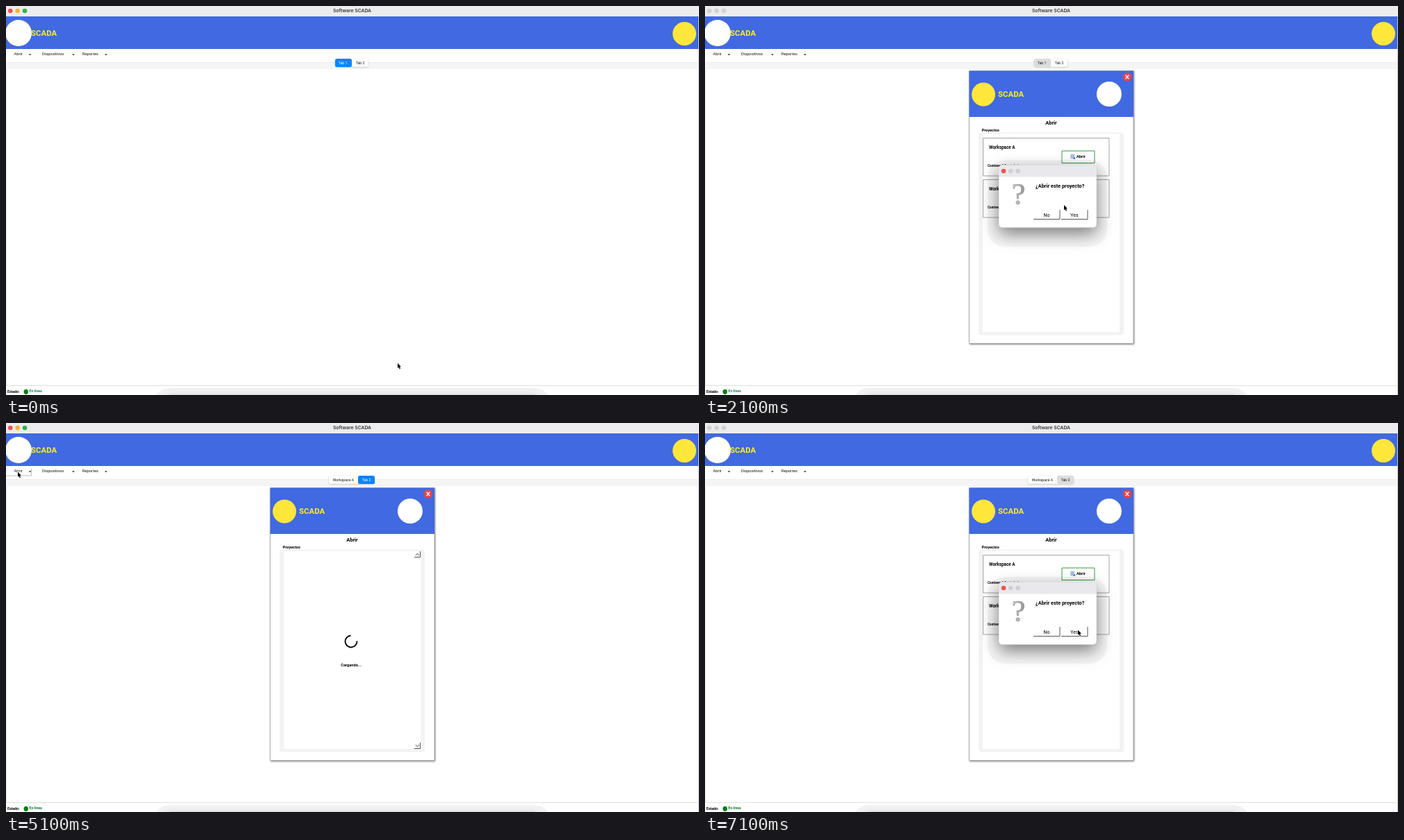
These frames come from a looping animation (998x561 px, 8000 ms). An HTML page with a canvas:

```html
<!DOCTYPE html>
<html lang="es">
<head>
<meta charset="utf-8">
<title>Software SCADA</title>
<style>
html, body { margin: 0; width: 100%; height: 100%; overflow: hidden; background: #fff; }
canvas { display: block; }
</style>
</head>
<body>
<canvas id="stage" width="998" height="561"></canvas>
<script>
const ctx = document.getElementById('stage').getContext('2d');
const ROYAL = '#4169e1', ACCENT = '#0a84ff', PANEL = '#f3f3f3', YELLOW = '#fff01a';
const LOOP = 8000;

function text(str, x, y, size, { weight = 700, color = '#000', align = 'left', family = 'Roboto' } = {}) {
  ctx.font = `${weight} ${size}px ${family}, sans-serif`;
  ctx.fillStyle = color;
  ctx.textAlign = align;
  ctx.textBaseline = 'middle';
  ctx.fillText(str, x, y);
}

function rect(x, y, w, h, color) {
  ctx.fillStyle = color;
  ctx.fillRect(x, y, w, h);
}

function round(x, y, w, h, r, fill, stroke, width = 1) {
  ctx.beginPath();
  ctx.roundRect(x, y, w, h, r);
  if (fill) { ctx.fillStyle = fill; ctx.fill(); }
  if (stroke) { ctx.strokeStyle = stroke; ctx.lineWidth = width; ctx.stroke(); }
}

function oval(x, y, rx, color, ry = rx) {
  ctx.beginPath();
  ctx.ellipse(x, y, rx, ry, 0, 0, Math.PI * 2);
  ctx.fillStyle = color;
  ctx.fill();
}

function poly(points, fill) {
  ctx.beginPath();
  points.forEach(([x, y]) => ctx.lineTo(x, y));
  ctx.closePath();
  ctx.fillStyle = fill;
  ctx.fill();
}

function line(points, color, width) {
  ctx.beginPath();
  points.forEach(([x, y]) => ctx.lineTo(x, y));
  ctx.strokeStyle = color;
  ctx.lineWidth = width;
  ctx.stroke();
}

function withShadow(color, blur, dx, dy, draw) {
  ctx.save();
  ctx.shadowColor = color;
  ctx.shadowBlur = blur;
  ctx.shadowOffsetX = dx;
  ctx.shadowOffsetY = dy;
  draw();
  ctx.restore();
}

function raised(x, y, w, h) {
  rect(x, y, w, h, '#fff');
  line([[x, y + h - .5], [x + w - .5, y + h - .5], [x + w - .5, y]], '#555', 1);
}

function trafficLights(x, y, gap, colors) {
  colors.forEach((c, i) => oval(x + i * gap, y, 3.3, c));
}

function tabs({ named, selected, blurred }) {
  const first = named ? { x: 465, w: 42, label: 'Workspace A' } : { x: 474, w: 24, label: 'Tab 1' };
  const second = { x: first.x + first.w, w: 24, label: 'Tab 2' };
  withShadow('rgba(0,0,0,.28)', 2, 0, .6, () =>
    round(first.x, 76.3, first.w + 24, 11.4, 2.5, '#fff'));
  [first, second].forEach((tab, i) => {
    const on = i === selected;
    if (on) round(tab.x, 76, tab.w, 12, 2.5, blurred ? '#dcdcdc' : ACCENT);
    text(tab.label, tab.x + tab.w / 2 - (i || named ? 0 : 1), 82.3, 5.2,
      { weight: 400, align: 'center', color: on && !blurred ? '#fff' : '#111' });
  });
}

function dock() {
  round(212, 551, 573, 40, [24, 24, 0, 0], '#f1f1f1');
  round(217, 556, 563, 40, [22, 22, 0, 0], '#ececec');
  rect(236, 560, 526, 1, '#d2d2d2');
}

function shell(scene, t) {
  rect(0, 0, 998, 561, '#fff');
  rect(0, 0, 998, 15, '#ececef');
  trafficLights(6.3, 7, 10.4, scene.blurred ? ['#d1d1d3', '#d1d1d3', '#d1d1d3'] : ['#f2524c', '#f5b532', '#2fb344']);
  text('Software SCADA', 498.5, 7.3, 6.8, { weight: 600, align: 'center', color: '#333', family: 'Inter' });
  rect(0, 15, 998, 47, ROYAL);
  oval(18, 39, 19, '#fff');
  oval(977, 40, 17, '#ffe63b');
  text('SCADA', 36, 40, 11.4, { color: YELLOW });

  [['Abrir', 11.5, 34.5], ['Dispositivos', 52, 97], ['Reportes', 110, 144]].forEach(([label, x, caret]) => {
    text(label, x, 69.7, 5.75, { weight: 400, color: '#111' });
    poly([[caret - 1.8, 69.2], [caret + 1.8, 69.2], [caret, 71.2]], '#222');
  });
  if (scene.menuHover) line([[0, 76], [36.5, 76], [36.5, 66]], '#aaa', .8);

  rect(0, 81, 998, 10, '#f5f5f5');
  rect(0, 81, 998, 1, '#ededed');
  tabs(scene);
  rect(0, 91, 1, 457, '#e2e2e2');
  rect(997, 15, 1, 546, '#c4c4c4');
  rect(0, 547, 998, 1, '#dedede');
  text('Estado:', 2, 556, 5.2);
  oval(28.8, 556.3, 3.2, '#087d12', 3.6);
  text('En línea', 33.5, 555, 5.2, { color: t < 3100 ? '#098a5c' : '#087d22' });
  dock();
}

function picture(x, y) {
  round(x, y, 62, 66, 5, '#ffc20e');
  oval(x + 48, y + 17.5, 5, '#fff5d6');
  poly([[x + 30, y + 50], [x + 42, y + 30], [x + 54, y + 50]], '#f08c00');
  poly([[x + 8, y + 50], [x + 24, y + 18], [x + 40, y + 50]], '#d95b00');
}

function controller(x, y) {
  round(x + 2, y + 4, 59, 58, 5, '#fff', '#000', 4);
  round(x + 8.5, y + 10.5, 46, 28, 3, null, '#000', 3);
  text('PLC', x + 31.5, y + 24.5, 17.5, { weight: 700, align: 'center' });
  for (let i = 0; i < 3; i++) round(x + 9 + i * 17, y + 44.5, 11, 9.5, 1, null, '#000', 3);
}

function remoteUnit(x, y) {
  [14, 24, 34, 45].forEach(dx => round(x + dx, y + 57, 6, 10, 1, '#8f9594'));
  poly([[x + 5, y], [x + 53, y], [x + 61, y + 6], [x + 58, y + 58], [x + 51, y + 64], [x + 1, y + 56]], '#90979a');
  poly([[x + 6, y + 1], [x + 51, y + 2], [x + 49, y + 62], [x + 2, y + 54]], '#b3b7b6');
  rect(x + 53, y + 8, 6, 18, '#168a3a');
  rect(x + 51, y + 34, 6, 18, '#168a3a');
  oval(x + 26, y + 41, 11, '#17903c', 5);
}

const CARDS = [
  { x: 52, y: 114, name: 'Climate_Station', seen: 'Nunca', art: picture, rows: [] },
  { x: 493, y: 171.5, name: 'PLC_Main', wait: 10, seen: '08/09/2025 10:59:42 PM', art: controller,
    rows: [['TEMP_OUTLET', 25], ['PRESSURE_IN', 89], ['FLOW_RATE', 14], ['PUMP_START', 'on']] },
  { x: 13, y: 266, name: 'RTU_Remota', wait: 20, seen: '08/09/2025 10:59:32 PM', art: remoteUnit,
    rows: [['LEVEL_TANK', 21], ['VALVE_STATE', 'off'], ['MOTOR_SPEED', 22], ['PUMP_STATUS', 'off']] },
  { x: 318.5, y: 364, name: 'Substation', wait: 25, seen: '08/09/2025 10:59:37 PM', art: picture,
    rows: [['VOLTAGE', 31], ['CURRENT', 38], ['FREQUENCY', 18], ['BREAKER_MAIN', 'off']] }
];

function card({ x, y, name, wait, seen, art, rows }) {
  text(name, x + 4.5, y - 5.5, 6.75);
  rect(x, y, 171, 102, PANEL);
  rect(x + 3, y, 168, 14, '#fff');
  text('Estado:', x + 8, y + 7.2, 5.1);
  oval(x + 35, y + 7, 3.4, '#858585');
  text('Desconocido', x + 40, y + 7.2, 5.15, { weight: 500, color: '#858585' });
  if (wait) {
    text('Actualizando en', x + 111.5, y + 6.7, 5.2);
    text(wait, x + 157, y + 6.2, 5.2, { align: 'right' });
  } else {
    text('¡No hay variables!', x + 109, y + 7, 5.2);
  }
  rect(x + 5, y + 16, 64, 69, rows.length && art !== picture ? '#fff' : PANEL);
  art(x + 6, y + (art === remoteUnit ? 16 : 17));
  rect(x + 73, y + 16, 92, 70, '#fff');
  rows.forEach(([label, value], i) => {
    const cy = y + 23.3 + i * 17.4;
    text(label, x + 75, cy, 5.75);
    if (value === 'on') rect(x + 129, cy - 5, 21, 11.5, '#087d12');
    if (value === 'off') raised(x + 129, cy - 5, 21, 11.5);
    const isState = typeof value === 'string';
    text(value, x + 139.8, cy + .7, 5.7,
      { align: 'center', weight: isState ? 500 : 700, color: value === 'on' ? '#fff' : '#000' });
  });
  text('Ultima Vez:', x + 5, y + 94.2, 5.2);
  rect(x + 39, y + 89, 91, 10, '#fff');
  text(seen, x + 40.5, y + 93.7, 5.2);
}

function projectRow(label, detail, y) {
  round(400.5, y + .5, 181.5, 54.5, 0, '#fff', '#a5a5a5');
  text(label, 409, y + 14.2, 6.35);
  text(detail, 407, y + 40.2, 4.7);
  round(514, y + 19, 47, 17.5, 0, '#fff', '#2f9e3c');
  rect(526, y + 23.5, 6.5, 7, '#c4d8f0');
  for (let i = 0; i < 3; i++) rect(527, y + 24.7 + i * 1.8, 4.5, .7, '#7795c4');
  oval(531.8, y + 29.5, 1.5, '#5d7fba');
  text('Abrir', 535, y + 27.6, 5.75);
}

function scrollButton(y, up) {
  raised(588, y - 4.5, 9, 9);
  const d = up ? -1.5 : 1.5;
  line([[590, y - d], [592.5, y + d], [595, y - d]], '#444', .9);
}

function openDialog(loading) {
  withShadow('rgba(0,0,0,.55)', 2.5, 1, 1, () => rect(380, 93, 237, 394, '#fff'));
  round(380.5, 93.5, 236.5, 393, 0, '#fff', '#a0a0a0', .8);
  rect(380.5, 93.5, 236.5, 66.5, ROYAL);
  oval(401, 127.5, 17, '#ffe63b');
  oval(582, 127, 18, '#fff');
  text('SCADA', 422, 127.6, 11.4, { color: YELLOW });
  oval(608, 102.3, 6.3, '#e8434c');
  line([[605.7, 99.5], [610.3, 105.1]], '#fff', 1.4);
  line([[610.3, 99.5], [605.7, 105.1]], '#fff', 1.4);
  text('Abrir', 498.5, 168.5, 7.4, { align: 'center' });
  round(394, 182.5, 209, 292, 4, PANEL);
  rect(400, 184.5, 197, 285.5, '#fff');
  text('Proyectos', 398.5, 179.2, 5.65);
  if (loading) {
    scrollButton(189.5, true);
    scrollButton(465.5, false);
    ctx.beginPath();
    ctx.arc(497, 315, 8.5, -.05, Math.PI * 1.48);
    ctx.strokeStyle = '#000';
    ctx.lineWidth = 1.9;
    ctx.stroke();
    text('Cargando...', 497, 349.2, 5.7, { align: 'center' });
  } else {
    projectRow('Workspace A', 'Contiene 4 Controladores', 190);
    projectRow('Workspace B', 'Contiene 2 Controladores', 250);
  }
}

function confirmDialog() {
  round(407, 222, 172, 125, 25, 'rgba(0,0,0,.035)');
  withShadow('rgba(0,0,0,.5)', 24, 0, 9, () => round(423, 229.5, 141, 90, 5, '#fff'));
  round(423, 229.5, 141, 90, 5, '#fff', '#c4c4c4', .6);
  round(423, 229.5, 141, 17, [5, 5, 0, 0], '#e9e8ec');
  trafficLights(430, 238, 10.3, ['#f2524c', '#cfcfd2', '#cfcfd2']);
  const shade = ctx.createLinearGradient(442, 0, 461, 0);
  shade.addColorStop(0, '#e0e0e0');
  shade.addColorStop(1, '#8e8e8e');
  text('?', 451.5, 274, 44, { weight: 400, align: 'center', color: shade, family: 'Liberation Serif' });
  ctx.strokeStyle = '#888';
  ctx.lineWidth = .7;
  ctx.strokeText('?', 451.5, 274);
  text('¿Abrir este proyecto?', 511.2, 260.2, 7.35, { align: 'center' });
  [['No', 473], ['Yes', 513]].forEach(([label, x]) => {
    raised(x, 294, 38.5, 14);
    text(label, x + 19, 301.5, 7, { weight: 400, align: 'center' });
  });
}

function cursor([x, y]) {
  ctx.save();
  ctx.translate(x, y);
  ctx.beginPath();
  [[0, 0], [0, 7.3], [1.6, 5.9], [2.8, 8.7], [4.1, 8.1], [2.9, 5.4], [5, 5.3]].forEach(p => ctx.lineTo(...p));
  ctx.closePath();
  ctx.lineJoin = 'round';
  ctx.strokeStyle = '#fff';
  ctx.lineWidth = 1.3;
  ctx.stroke();
  ctx.fillStyle = '#000';
  ctx.fill();
  ctx.restore();
}

const SCENES = [
  { at: 0, selected: 0, pointer: [564, 515] },
  { at: 100, selected: 0, dialog: 'loading', menuHover: true, pointer: [17, 70] },
  { at: 1100, selected: 0, dialog: 'list', pointer: [536, 218] },
  { at: 2100, selected: 0, dialog: 'confirm', blurred: true, pointer: [517, 287] },
  { at: 3100, selected: 0, named: true, cards: true, pointer: [528, 223] },
  { at: 4100, selected: 1, named: true, pointer: [506.5, 84.5] },
  { at: 5100, selected: 1, named: true, dialog: 'loading', menuHover: true, pointer: [17, 70.5] },
  { at: 6100, selected: 1, named: true, dialog: 'list', pointer: [536, 218] },
  { at: 7100, selected: 1, named: true, dialog: 'confirm', blurred: true, pointer: [537, 298.5] }
];

function frame() {
  const t = performance.now() % LOOP;
  const scene = SCENES.findLast(s => t >= s.at);
  shell(scene, t);
  if (scene.cards) CARDS.forEach(card);
  if (scene.dialog) openDialog(scene.dialog === 'loading');
  if (scene.dialog === 'confirm') confirmDialog();
  cursor(scene.pointer);
  requestAnimationFrame(frame);
}
requestAnimationFrame(frame);
</script>
</body>
</html>
```
